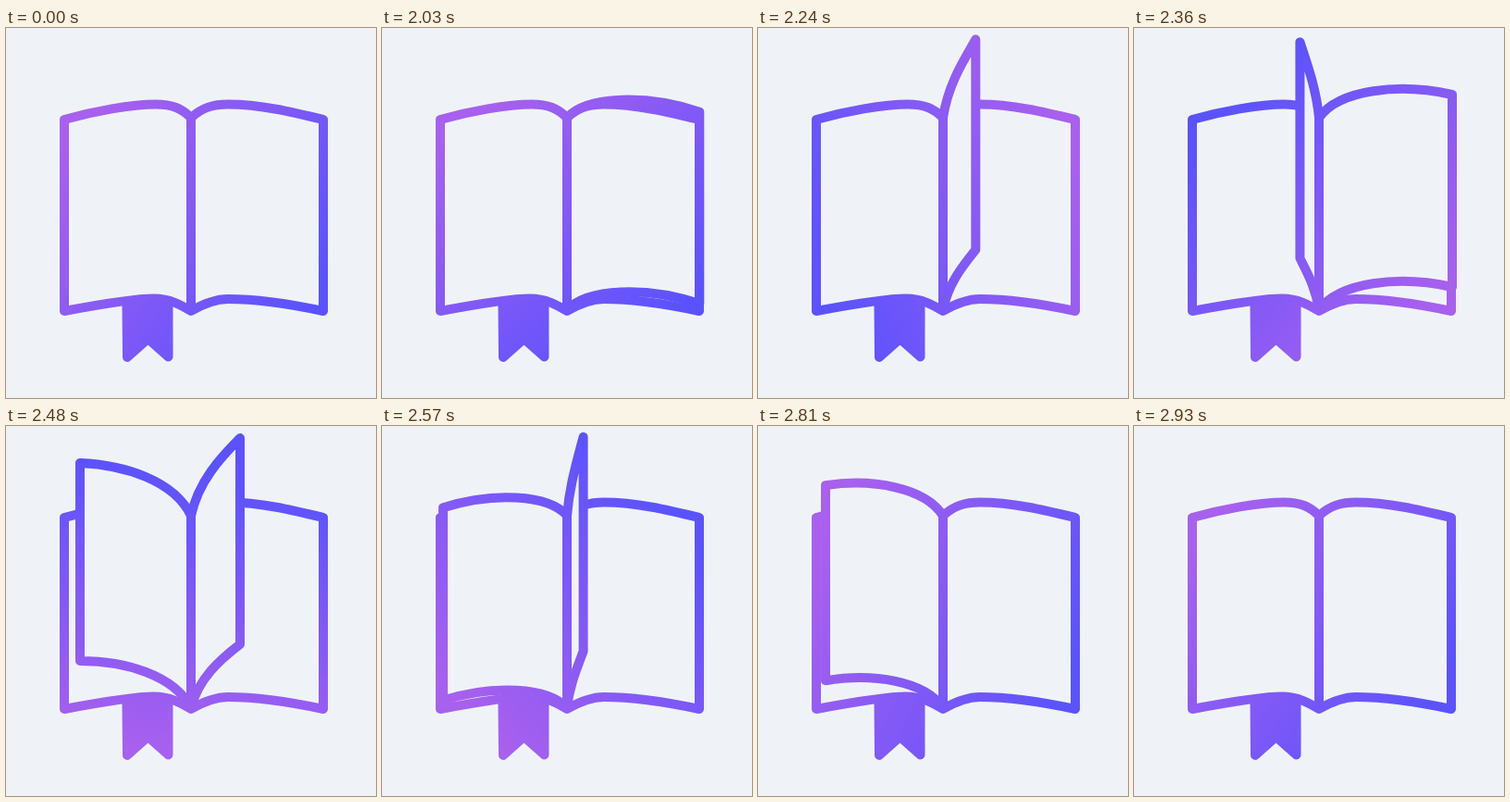
An HTML page with a canvas that plays this animation: 400 px wide and 400 px high, repeating every 2960 ms.

```html
<!DOCTYPE html>
<html lang="en">
<head>
<meta charset="utf-8">
<title>Book flipping its pages</title>
<style>
  html, body { margin: 0; width: 400px; height: 400px; overflow: hidden; background: #eff3f8 }
  canvas { display: block }
</style>
</head>
<body>
<canvas id="stage" width="400" height="400"></canvas>
<script>
const ctx = document.getElementById('stage').getContext('2d');
const LOOP = 2960, REST = 2030, STEP = 30, START = 2000, SPIN = 930, STAGGER = 285;
const PAPER = '#eff3f8', LINE = 10;
const SPINE = 200, HEAD = 97, FOOT = 305, EDGE = 99;

const bookmark = new Path2D('M130.5 300L131 356L153.5 336L175.5 355.5V300Z');
const book = new Path2D(`
  M200 97C190 87 180 82.5 162 82.5C135 82.5 95 90 63 99V306
  C95 300 135 292.5 160 292.5C178 292.5 190 300 200 306
  C212 299 225 293 240 293C275 293 310 299 343 306V99
  C310 91 275 82.5 240 82.5C224 82.5 212 86 200 97Z`);
const spine = new Path2D(`M${SPINE} ${HEAD}V${FOOT}`);

// Key poses of a page's outer edge: when, x, top and bottom.
const keys = [
  [10, 343, EDGE, 306],   // flat on the right
  [75, 344, 72, 280],     // lifted
  [195, 253, 13, 236],    // rising
  [340, 196, 11, 248],    // upright
  [480, 80, 40, 254],     // falling
  [590, 63, EDGE, 306]    // flat on the left
];

function edgeAt(ms) {
  const i = keys.findIndex(key => key[0] > ms);
  if (i < 1) return null;
  const a = keys[i - 1], b = keys[i];
  const k = (ms - a[0]) / (b[0] - a[0]);
  return a.map((v, j) => v + (b[j] - v) * k).slice(1);
}

// Half-page outline from the spine to a corner, bulging more the wider it lies.
function curl(x, y, rootY) {
  const dx = x - SPINE, dy = y - rootY, bulge = 0.15 * Math.abs(dx);
  return [
    SPINE + 0.15 * dx, rootY + 0.35 * dy - bulge,
    SPINE + 0.6 * dx, rootY + 0.65 * dy - bulge
  ];
}

function drawPage(ms) {
  const edge = edgeAt(ms);
  if (!edge) return;
  const [x, top, bottom] = edge;
  const [ax, ay, bx, by] = curl(x, bottom, FOOT);
  const page = new Path2D();
  page.moveTo(SPINE, HEAD);
  page.bezierCurveTo(...curl(x, top, HEAD), x, top);
  page.lineTo(x, bottom);
  page.bezierCurveTo(bx, by, ax, ay, SPINE, FOOT);
  page.closePath();
  // The line beneath shows until the page is clear of it.
  if (EDGE - top > LINE) ctx.fill(page);
  ctx.stroke(page);
}

function gradient(angle) {
  const x = 152 * Math.cos(angle), y = 152 * Math.sin(angle);
  const g = ctx.createLinearGradient(203 - x, 203 - y, 203 + x, 203 + y);
  g.addColorStop(0, '#a860ee');
  g.addColorStop(1, '#5b52fe');
  return g;
}

function draw(now) {
  let t = now % LOOP;
  t = t < REST ? START : t - (t - REST) % STEP;
  const ms = t - START, u = ms / SPIN;
  const turn = u * (1.25 + u * (0.5 - 0.75 * u));

  ctx.fillStyle = PAPER;
  ctx.fillRect(0, 0, 400, 400);
  ctx.lineWidth = LINE;
  ctx.lineJoin = ctx.lineCap = 'round';
  ctx.strokeStyle = ctx.fillStyle = gradient((35 + 360 * turn) * Math.PI / 180);
  ctx.fill(bookmark);
  ctx.stroke(bookmark);
  ctx.fillStyle = PAPER;
  ctx.fill(book);
  ctx.stroke(book);

  // The upper page on the right ends up the lower one on the left.
  const pages = [ms, ms - STAGGER];
  if (ms < 400) pages.reverse();
  pages.forEach(drawPage);
  ctx.stroke(spine);
}

const origin = performance.now();
function tick() {
  draw(performance.now() - origin);
  requestAnimationFrame(tick);
}
tick();
</script>
</body>
</html>
```
